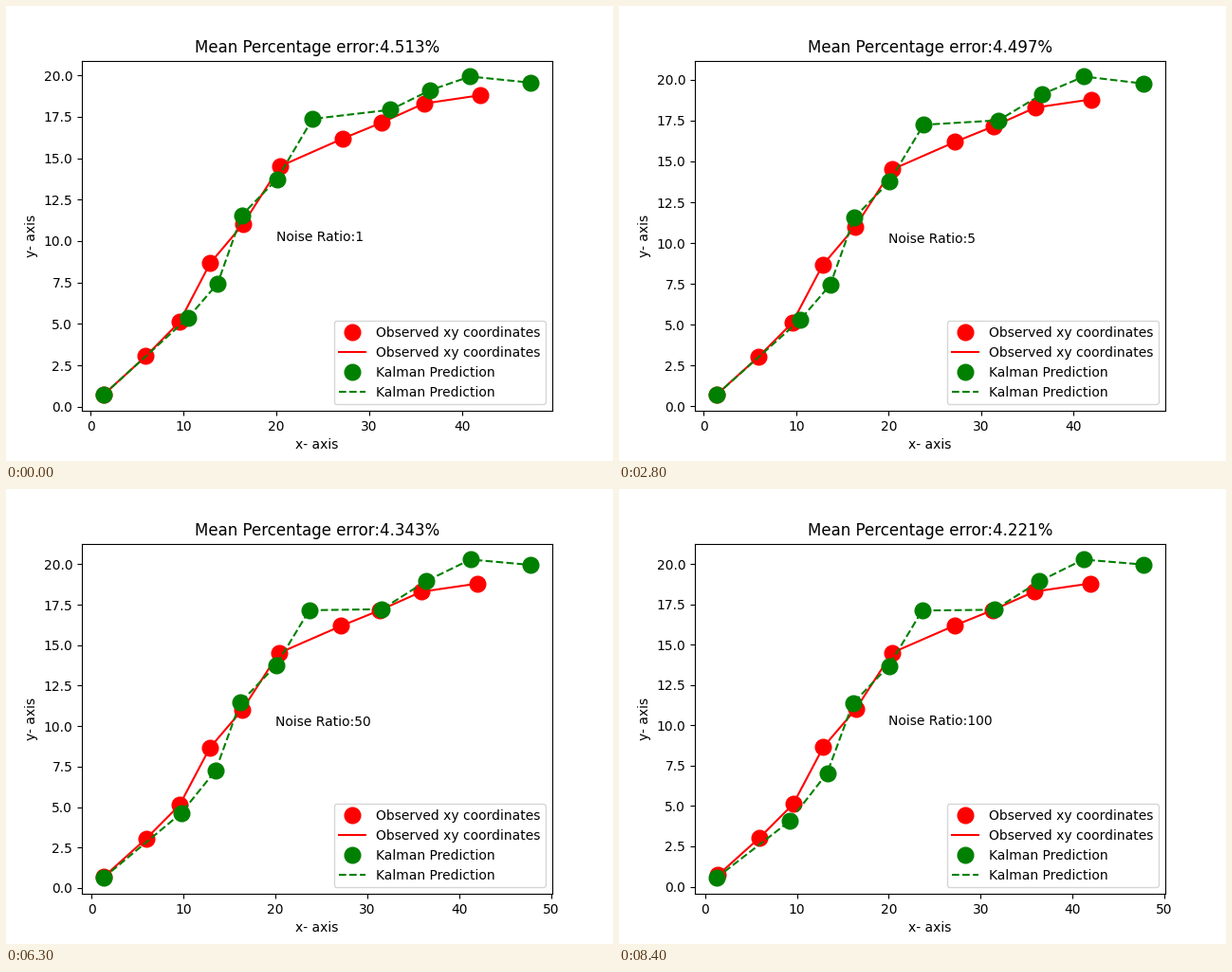
These frames come from a looping animation (640x480 px, 9100 ms). A matplotlib script:

```python
import matplotlib.pyplot as plt
import numpy as np
from matplotlib.animation import FuncAnimation

OBSERVED = np.array([
    (1.38, 0.71), (5.95, 3.05), (9.58, 5.12), (12.87, 8.66), (16.40, 11.01),
    (20.38, 14.51), (27.15, 16.19), (31.32, 17.15), (35.86, 18.30), (41.91, 18.80),
])
RATIOS = [1, 2, 3, 4, 5, 10, 15, 20, 30, 50, 70, 90, 100]

# Key points of the error curve; values between them are interpolated.
ERROR_CURVE = [(1, 4.513), (3, 4.508), (5, 4.497), (15, 4.452),
               (50, 4.343), (70, 4.291), (100, 4.221)]


def kalman(noise):
    """One-step-ahead positions from a constant-velocity Kalman filter."""
    state = np.zeros(4)  # x, y, vx, vy
    cov = 1000 * np.eye(4)
    step = np.eye(4) + np.eye(4, k=2)
    measure = np.eye(2, 4)
    path = []
    for point in OBSERVED:
        # The scalar noise is shared by both axes, so it fills the matrix.
        spread = measure @ cov @ measure.T + noise
        gain = cov @ measure.T @ np.linalg.inv(spread)
        state = step @ (state + gain @ (point - measure @ state))
        cov = step @ (cov - gain @ measure @ cov) @ step.T + np.eye(4)
        path.append(state[:2])
    return np.transpose(path)


fig, ax = plt.subplots(figsize=(6.4, 4.8), dpi=100)


def add_series(x, y, color, dash, label):
    dots, = ax.plot(x, y, color + "o", markersize=12, label=label)
    line, = ax.plot(x, y, color + dash, label=label)
    return dots, line


add_series(*OBSERVED.T, "r", "-", "Observed xy coordinates")
prediction = add_series(*kalman(RATIOS[0]), "g", "--", "Kalman Prediction")
ax.set_xlabel("x- axis")
ax.set_ylabel("y- axis")
ax.legend(loc="lower right")
title = ax.set_title("")
note = ax.text(20, 10, "")


def draw(i):
    ratio = RATIOS[i]
    path = kalman(ratio)
    for artist in prediction:
        artist.set_data(*path)
    ax.relim()
    ax.autoscale_view()
    error = np.interp(ratio, *zip(*ERROR_CURVE))
    title.set_text(f"Mean Percentage error:{error:.3f}%")
    note.set_text(f"Noise Ratio:{ratio}")
    return *prediction, title, note


anim = FuncAnimation(fig, draw, frames=len(RATIOS), interval=700, repeat=True)
plt.show()
```
